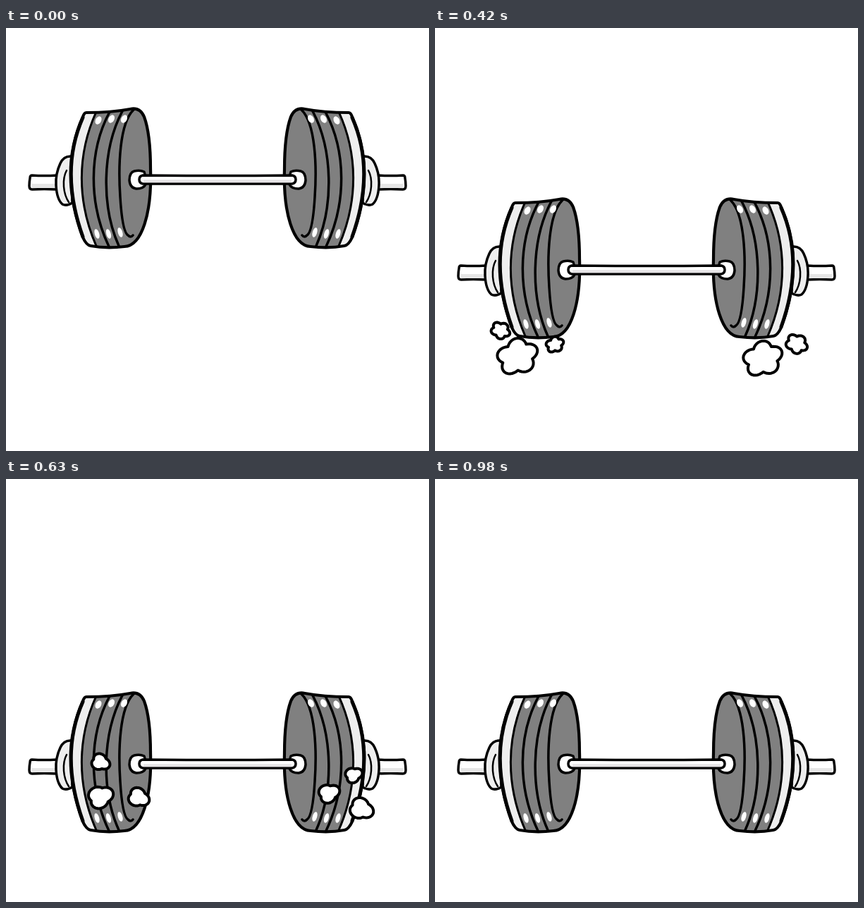
Write an HTML page that moves like this. It is 600x600 px and loops after 1680 ms.

```html
<!DOCTYPE html>
<html lang="en">
<head>
<meta charset="utf-8">
<title>Dropped barbell</title>
<style>
  html, body { margin: 0; width: 100%; height: 100%; overflow: hidden; background: #fff; }
  svg { display: block; width: 100%; height: 100%; }
</style>
</head>
<body>
<svg viewBox="0 0 600 600">
  <defs>
    <path id="rim" d="M114 120Q150 120 176 115Q190 112 196 126C203 145 205 172 205 200C207 262 193 309 168 310Q142 313 120 309Q114 308 109 297C86 235 86 177 109 126Q111 120 114 120Z"/>
    <clipPath id="inside"><use href="#rim"/></clipPath>
    <g id="side" fill="none" stroke="#000" stroke-width="3.5" stroke-linejoin="round" stroke-linecap="round">
      <!-- sleeve and collar -->
      <path fill="#fff" d="M37 209Q54 210 72 209V229Q54 228 37 229Q33 229 33 224Q33 218 34 213Q34 209 37 209Z"/>
      <path stroke="none" fill="#e6e6e6" d="M37 221H70V227H37Z"/>
      <path fill="#eee" d="M93 182Q82 181 77 192Q70 207 71 223Q72 243 80 250Q86 253 94 248Z"/>
      <path stroke-width="2.5" d="M86 202Q81 211 82 225Q83 238 89 247"/>
      <!-- plates -->
      <use href="#rim" fill="#808080" stroke="none"/>
      <g clip-path="url(#inside)">
        <path fill="#eee" stroke="none" d="M80 115H128C101 178 100 245 128 312H80Z"/>
        <path stroke-width="3" d="M128 119C101 178 100 245 128 309"/>
        <path d="M147 119C117 175 117 249 146 310M165 118C136 173 135 253 160 309"/>
        <path d="M181 116C161 135 159 195 162 240Q165 289 173 294Q177 298 180 294"/>
      </g>
      <use href="#rim" stroke-width="4.2"/>
      <path stroke-width="5" d="M109 127C87 177 87 235 109 296"/>
      <!-- shine -->
      <g fill="#fff" stroke="none">
        <ellipse id="shine" cx="131" cy="131" rx="4" ry="6" transform="rotate(28 131 131)"/>
        <use href="#shine" x="18.5" y="-2"/>
        <use href="#shine" x="36.5" y="-2"/>
        <ellipse id="glint" cx="129" cy="292" rx="3.2" ry="7" transform="rotate(-17 129 292)"/>
        <use href="#glint" x="16.5"/>
        <use href="#glint" x="33" y="-2"/>
      </g>
      <!-- hub -->
      <path fill="#fff" d="M182 203Q190 201 196 204Q199 212 198 222Q195 228 185 228Q176 227 175 216Q175 205 182 203Z"/>
    </g>
  </defs>
  <g id="barbell">
    <use href="#side"/>
    <use href="#side" transform="translate(600) scale(-1 1)"/>
    <path fill="#fff" stroke="#000" stroke-width="3.5" d="M194 209Q300 210 406 209Q411 210 411 215Q411 220 406 221Q300 221 194 221Q189 220 189 215Q189 210 194 209Z"/>
    <path fill="none" stroke="#e6e4e6" stroke-width="4" d="M195 217.3H405"/>
  </g>
  <path id="dust" fill="#fff" stroke="#000" stroke-width="4" stroke-linejoin="round"/>
</svg>
<script>
  const STEP = 70, LOOP = 1680, HOLD = 4, LAST = 10;
  const barbell = document.getElementById('barbell');
  const dust = document.getElementById('dust');

  // The dust breaks up in three stages; each puff is x, y, radius.
  const stages = [
    { lobes: 5, puffs: [[117,466,30], [93,429,14], [465,469,29], [513,448,16], [170,449,13]] },
    { lobes: 3, puffs: [[134,458,19], [134,409,14], [458,453,16], [188,459,16], [493,427,13], [504,475,18]] },
    { lobes: 2, puffs: [[104,429,13], [142,414,14], [171,437,11], [489,396,12], [492,433,11], [460,415,12],
                        [118,386,8], [153,366,7], [446,371,7], [480,364,7]] }
  ];

  // A scalloped oval, tilted to alternate sides.
  function puffPath([x, y, radius], index, lobes, rise) {
    const tilt = index % 2 ? 0.4 : -0.4;
    let d = '';
    for (let k = 0; k < 60; k++) {
      const a = k / 60 * 2 * Math.PI;
      const r = radius * (0.75 + 0.25 * Math.abs(Math.cos(lobes * a / 2)));
      const u = r * Math.cos(a), v = 0.85 * r * Math.sin(a);
      const px = x + u * Math.cos(tilt) - v * Math.sin(tilt);
      const py = y - rise + u * Math.sin(tilt) + v * Math.cos(tilt);
      d += `${k ? 'L' : 'M'}${px.toFixed(1)} ${py.toFixed(1)}`;
    }
    return d + 'Z';
  }

  // Fall, impact, bounce, then rest.
  const dropAt = i => i < 0 ? 0 : [128, 199, 128][i] ?? 189;

  function dustAt(i) {
    if (i < 2 || i >= LAST) return '';
    const n = Math.min((i - 2) >> 1, 2);
    const age = i - 2 - 2 * n;
    const rise = 1.8 * age * (age + 3);
    const { lobes, puffs } = stages[n];
    return puffs.map((p, k) => puffPath(p, k, lobes, rise)).join('');
  }

  let shown;
  function draw(now) {
    const i = Math.min(Math.floor(now % LOOP / STEP) - HOLD, LAST);
    if (i === shown) return;
    shown = i;
    barbell.setAttribute('transform', `translate(0 ${dropAt(i)})`);
    dust.setAttribute('d', dustAt(i));
  }

  const start = performance.now();
  function tick() {
    draw(performance.now() - start);
    requestAnimationFrame(tick);
  }
  tick();
</script>
</body>
</html>
```
